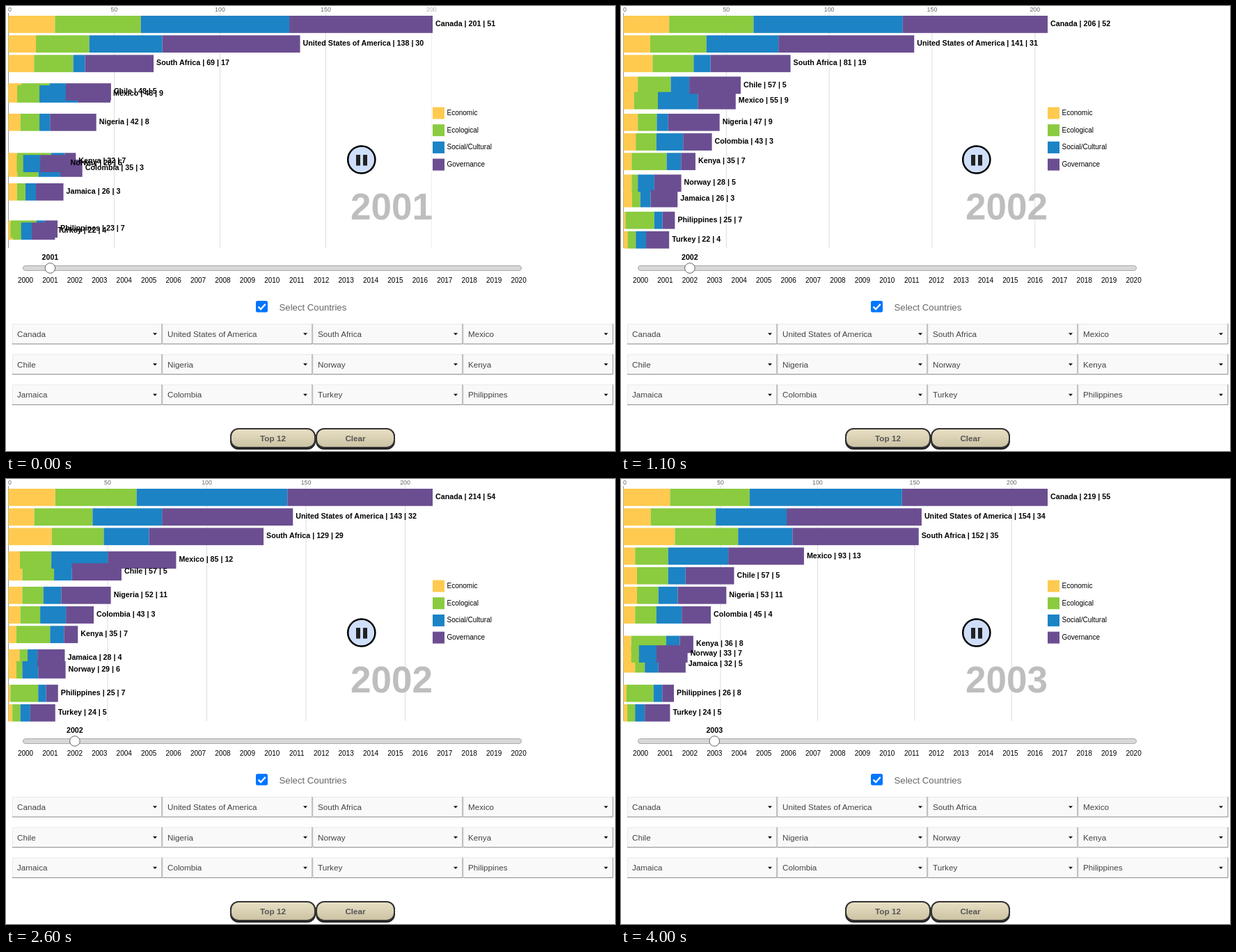
Animation of 875x640 px, one loop 4.1 s. Source, as an HTML page:

```html
<!DOCTYPE html>
<html lang="en">
<head>
<meta charset="utf-8">
<title>Country bar race</title>
<style>
  html, body { margin: 0; width: 100%; height: 100%; overflow: hidden; background: #fff; }
  svg { display: block; font-family: "Liberation Sans", Arial, sans-serif; }
  .mid { text-anchor: middle; }
  .axis { font-size: 8.8px; fill: #666; }
  .label { font-size: 10.7px; font-weight: bold; }
  .small { font-size: 10px; }
  .year { font-size: 53px; font-weight: bold; fill: #bebebe; text-anchor: end; }
  .option { font-size: 11.7px; fill: #444; }
  .button { font-size: 11.7px; font-weight: bold; fill: #555; text-anchor: middle; }
</style>
</head>
<body>
<svg id="stage" width="875" height="640" viewBox="0 0 875 640">
  <defs>
    <linearGradient id="sand" x2="0" y2="1">
      <stop stop-color="#e9e1c6"/><stop offset="1" stop-color="#cbc1a2"/>
    </linearGradient>
  </defs>
</svg>
<script>
const LOOP = 4100, LEFT = 3.5, WIDTH = 609.5, TOP = 14, ROW = 28.18, BAR = 24.8;
const SERIES = [["Economic", "#ffca4f"], ["Ecological", "#8acb3f"],
  ["Social/Cultural", "#1c83c5"], ["Governance", "#6b4e91"]];

// Values at the start of 2001 to 2004: four series, then the second label figure.
// A gap, or a missing end, repeats the value before it.
const DATA = {
  "Canada": [[22,, 24], [40, 41], [68, 72, 77, 80], [65, 70, 74, 76], [50, 52, 54, 56]],
  "United States of America": [[13,,, 15], [23, 27, 30, 37], [34, 35,, 38], [64, 66,, 73], [29, 31, 32, 36]],
  "South Africa": [[11, 13, 24, 29], [18, 19, 28, 37], [5, 6, 27, 29], [28, 36, 63, 67], [16, 18, 31.1, 38]],
  "Mexico": [[3, 5, 6], [10, 11, 17], [18,, 31], [15, 16, 39], [9,, 13]],
  "Chile": [[5, 7], [10, 16], [6, 9], [17, 25], 5],
  "Nigeria": [[4, 7], [9,, 11], [5,, 10], [18, 25], [7, 9, 11]],
  "Colombia": [[2, 6], [10,,, 12], [7, 13], [6, 14,, 16], [3,,, 5]],
  "Jamaica": [[4,, 6], [4,,, 6], [5,,, 9], [13,, 14], [3,, 4, 6]],
  "Norway": [4, [3,,, 5], [8,,, 10], [13,, 14, 18], [5,, 6, 8]],
  "Kenya": [4, [15, 17,, 19], [6, 7], [3, 7], [7,,, 9]],
  "Philippines": [[1,,, 2], [10, 14], [4,,, 5], 6, [7,,, 9]],
  "Turkey": [2, 4, 5, [11,, 13], [4,, 5]]
};
const OPTIONS = ["Canada", "United States of America", "South Africa", "Mexico", "Chile", "Nigeria",
  "Norway", "Kenya", "Jamaica", "Colombia", "Turkey", "Philippines"];
// Playback: time in ms and years since 2001
const PACE = [[0, .552], [800, .954], [1400, 1.258], [1600, 1.258], [2000, 1.464],
  [2600, 1.803], [3100, 2.053], [4000, 2.505]];

const stage = document.getElementById("stage");

function set(el, attrs) {
  for (const key in attrs) el.setAttribute(key, attrs[key]);
  return el;
}
function add(tag, attrs) {
  return stage.appendChild(set(document.createElementNS(stage.namespaceURI, tag), attrs));
}
function text(x, y, className, content = "") {
  const el = add("text", { x, y, class: className });
  el.textContent = content;
  return el;
}
function rect(x, y, width, height, fill, more) {
  return add("rect", { x, y, width, height, fill, ...more });
}
function path(d, stroke, width = 1, fill = "none") {
  return add("path", { d, stroke, "stroke-width": width, fill });
}

function fillGaps(values) {
  const list = [].concat(values);
  let last;
  return [0, 1, 2, 3].map(i => last = list[i] ?? last);
}
function at(knots, years) {
  const i = Math.floor(years);
  return knots[i] + (knots[i + 1] - knots[i]) * (years - i);
}
function yearsAt(ms) {
  const i = PACE.findIndex(([time]) => time >= ms);
  if (i < 1) return PACE[0][1];
  const [t0, y0] = PACE[i - 1], [t1, y1] = PACE[i];
  return y0 + (y1 - y0) * (ms - t0) / (t1 - t0);
}

const countries = Object.entries(DATA).map(([name, rows]) => {
  const knots = rows.map(fillGaps), parts = knots.slice(0, 4);
  const total = [0, 1, 2, 3].map(i => parts.reduce((sum, part) => sum + part[i], 0));
  return { name, parts, total, second: knots[4], rank: [] };
});
for (let i = 0; i < 4; i++)
  [...countries].sort((a, b) => b.total[i] - a.total[i]).forEach((c, row) => c.rank[i] = row);

// Chart
const ticks = [0, 50, 100, 150, 200].map(value => ({
  value,
  line: path("M0 10V348", value ? "#ddd" : "#999"),
  label: text(0, 8, "axis mid", value)
}));
const bars = SERIES.map(([, color]) => countries.map(() => rect(0, 0, 0, BAR, color)));
const labels = countries.map(() => text(0, 0, "label"));
SERIES.forEach(([name, color], i) => {
  const y = 145.5 + 24.7 * i;
  rect(613, y, 17, 17, color);
  text(633.5, y + 11.5, "small", name);
});
add("circle", { cx: 510.8, cy: 221, r: 19.6, fill: "#cfdff9", stroke: "#000", "stroke-width": 2.5 });
rect(503, 214, 6, 15.5, "#222");
rect(513, 214, 6, 15.5, "#222");
const bigYear = text(613, 307, "year");

// Year slider
const yearX = year => 28 + 35.43 * (year - 2000);
rect(24.5, 373.5, 716, 7, "#d8d8d8", { rx: 3.5, stroke: "#aaa" });
for (let year = 2000; year <= 2020; year++) text(yearX(year), 397.5, "small mid", year);
const thumb = add("circle", { cy: 377, r: 7.3, fill: "#fff", stroke: "#666" });
const thumbYear = text(0, 365, "label mid");

// Country pickers
rect(359, 424, 17, 16.5, "#0075ff", { rx: 2.5 });
path("M362.5 432.5l3.6 3.6 6.6-7.4", "#fff", 2.3);
set(text(392.5, 438, "", "Select Countries"), { "font-size": 13.2, fill: "#666" });
OPTIONS.forEach((name, i) => {
  const x = 9 + 216 * (i % 4), y = 457 + 43.7 * Math.floor(i / 4);
  rect(x, y, 215.5, 29.5, "#f9f9f9");
  path(`M${x + .5} ${y + 29}V${y + .5}H${x + 215}`, "#eaeaea");
  path(`M${x} ${y + 29}H${x + 215}V${y}`, "#888");
  text(x + 7, y + 19, "option", name);
  path(`M${x + 202} ${y + 13.3}h6l-3 3.2z`, "none", 0, "#111");
});
for (const [name, x, width] of [["Top 12", 323, 121], ["Clear", 446, 112]]) {
  rect(x, 609, width, 28, "#222", { rx: 11, stroke: "#222", "stroke-width": 2 });
  rect(x, 608, width, 27, "url(#sand)", { rx: 11, stroke: "#333", "stroke-width": 2 });
  text(x + width / 2, 626, "button", name);
}

function draw(ms) {
  const years = yearsAt(ms);
  const scale = WIDTH / Math.max(...countries.map(c => at(c.total, years)));

  for (const { value, line, label } of ticks) {
    const x = LEFT + value * scale;
    const opacity = value === 200 ? Math.min(1, (years - .5) * 10) : 1;
    set(line, { transform: `translate(${x})`, opacity });
    set(label, { x: value ? x : 5.5, opacity });
  }
  countries.forEach((c, row) => {
    const y = TOP + ROW * at(c.rank, years);
    let x = LEFT;
    c.parts.forEach((part, i) => {
      const width = at(part, years) * scale;
      set(bars[i][row], { x, y, width });
      x += width;
    });
    set(labels[row], { x: x + 4, y: y + 15 }).textContent =
      `${c.name} | ${Math.round(at(c.total, years))} | ${Math.round(at(c.second, years))}`;
  });

  const year = 2001 + Math.floor(years);
  bigYear.textContent = thumbYear.textContent = year;
  set(thumb, { cx: yearX(year) });
  set(thumbYear, { x: yearX(year) });
}

function loop() {
  draw(Math.floor(performance.now() % LOOP / 100) * 100);
  requestAnimationFrame(loop);
}
loop();
</script>
</body>
</html>
```
